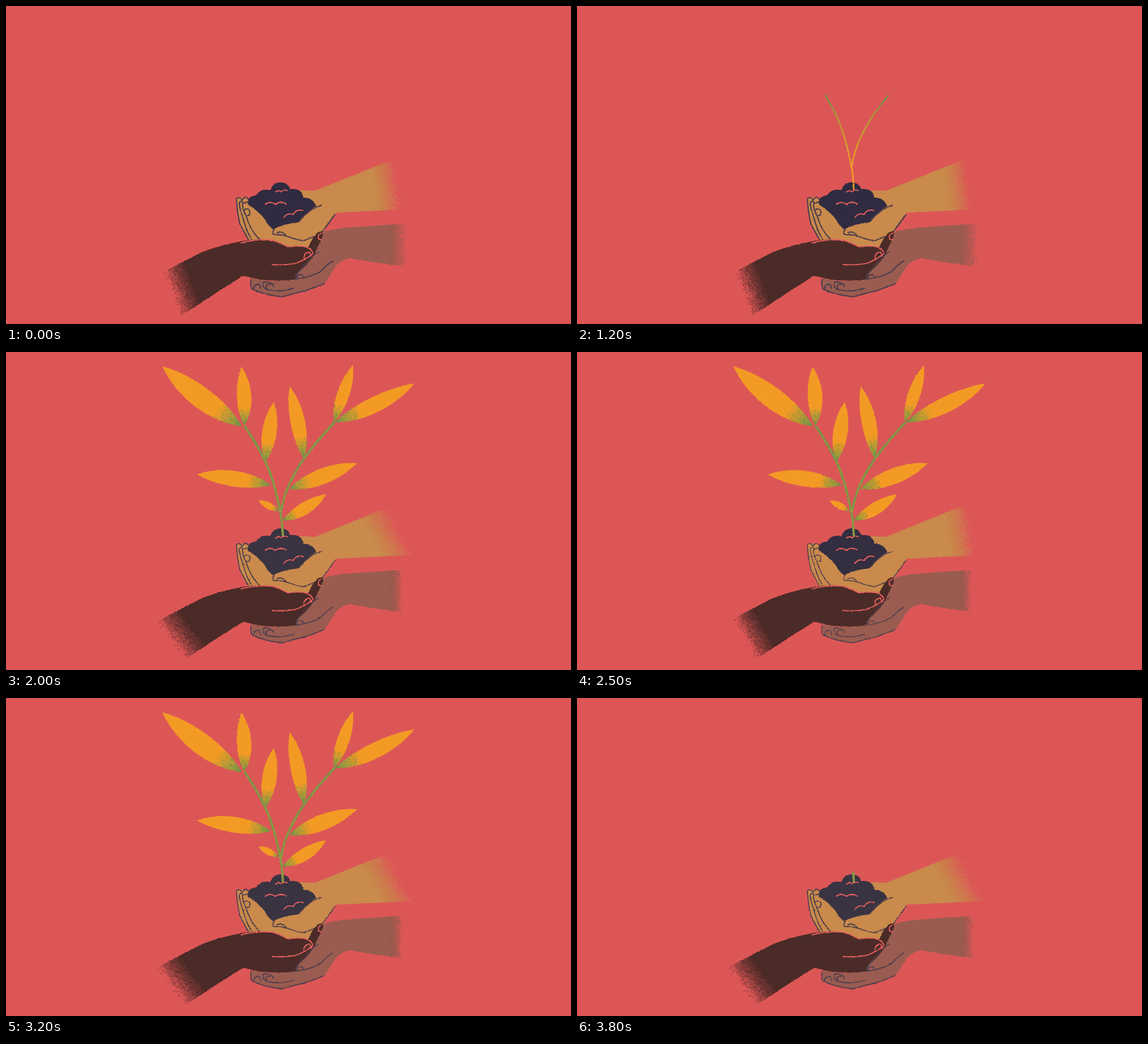
An HTML page with a canvas that plays this animation: 998x561 px, repeating every 3900 ms.

```html
<!DOCTYPE html>
<html lang="en">
<head>
<meta charset="utf-8">
<title>Growing together</title>
<style>
html, body { margin: 0; width: 100%; height: 100%; overflow: hidden; background: #dd5656; }
canvas { display: block; }
svg { position: absolute; width: 0; height: 0; }
</style>
</head>
<body>
<canvas id="stage" width="998" height="561"></canvas>
<svg>
  <filter id="rough" x="0" y="0" width="1" height="1" color-interpolation-filters="sRGB">
    <feTurbulence id="noise" type="fractalNoise" baseFrequency=".3" numOctaves="2"/>
    <feColorMatrix values="1 0 0 0 0  0 1 0 0 0  0 0 1 0 0  0 0 0 0 1" result="bumps"/>
    <feDisplacementMap in="SourceGraphic" in2="bumps" scale="2.5" xChannelSelector="R" yChannelSelector="G"/>
  </filter>
</svg>
<script>
const W = 998, H = 561, STEP = 100, STEPS = 39;
const BG = '#dd5656', TAN = '#c98a4b', DARK = '#4a2b27', BROWN = '#9a5c50';
const INK = '#4c3d4c', PINK = '#e8605f', ORANGE = '#f39a24', GREEN = '#66904a';

const stage = document.getElementById('stage');
const noise = document.getElementById('noise');
const view = stage.getContext('2d');
stage.style.filter = 'url(#rough)';

// Line weight, soil colour and fade axes (solid x, y, gone x, y) of the three alternating drawings
const poses = [
  { line: 2.2, soil: '#302b40', tan: [652, 322, 694, 316], brown: [676, 420, 709, 420], dark: [333, 490, 290, 506] },
  { line: 1.5, soil: '#332e40', tan: [656, 322, 699, 315], brown: [676, 420, 697, 420], dark: [333, 484, 293, 507] },
  { line: 1.8, soil: '#393342', tan: [645, 323, 690, 298], brown: [678, 420, 701, 420], dark: [330, 482, 290, 513] }
];

const shapes = {
  tan: `M407 339 L418 337 L428 341 L440 345 L522 325 L545 326 Q620 296 720 256 V358 Q640 362 582 365
    L566 390 Q558 402 556 415 L540 432 H435 L427 412 L413 388 Q408 362 407 339Z`,
  soil: `M427 350 Q425 336 442 334 Q450 321 467 325 Q471 311 486 311 Q499 312 502 323 Q523 321 525 338
    Q542 338 548 353 Q537 359 529 368 Q522 378 515 382 Q490 384 472 394 Q463 388 457 376 Q445 361 427 350Z`,
  dark: `M255 482 Q320 447 346 434 Q380 421 420 414 Q446 409 470 413 Q486 418 498 425 Q516 422 527 424
    L534 425 Q541 409 549 401 Q554 396 558 398 Q562 400 560 408 L545 440 L516 482 Q485 487 450 483
    Q435 480 419 476 Q374 504 335 530 L290 559Z`,
  brown: `M562 398 Q575 394 600 391 Q660 386 715 384 V461 Q650 453 607 445 Q590 449 582 460 L563 490
    Q525 506 488 513 Q458 510 440 503 Q431 496 433 486 L435 480 Q470 489 512 482 Q512 472 522 465
    Q538 450 545 437 Q550 424 557 412Z`
};

const inkLines = {
  tan: `M428 412 Q416 390 413 384 Q408 362 407 340 Q413 335 417 343 Q423 333 428 341
    M412 347 Q413 360 418 372 Q424 396 433 410 M418 348 Q417 358 424 370 Q431 395 447 411
    M412 347 Q416 342 420 348 L428 345 M421 360 Q427 355 431 362 L430 369 L424 370
    M557 352 Q542 356 534 364 Q524 371 518 380 M474 394 Q470 397 472 403 Q488 403 499 407
    Q515 413 526 414 Q546 406 556 402 Q568 386 581 368 M478 400 Q490 396 494 405`,
  brown: `M552 434 Q541 439 531 453 Q517 467 512 476 V482 Q544 477 557 467 Q568 455 577 450
    M515 481 Q512 473 523 474 L527 480 M433 482 Q431 492 434 499 Q456 510 488 513 Q508 507 530 502
    L562 490 M437 500 Q438 490 447 491 L450 499 M455 487 Q470 486 473 495
    M455 487 Q451 499 466 501 Q486 505 508 498 M461 499 Q456 490 467 491`
};

const pinkLines = {
  soil: `M458 350 Q467 343 476 350 Q484 343 495 349 M491 373 Q497 364 507 368 Q513 357 525 361
    M476 328 Q482 324 486 328 Q491 323 497 326`,
  dark: `M415 418 Q440 411 470 413 Q484 417 498 425 Q518 422 530 425 Q542 430 542 437
    Q530 447 512 454 Q490 458 470 456 M527 446 Q524 436 536 434 L539 441
    M557 401 Q550 402 552 411 L558 413`
};

function seeded(seed) {
  return () => {
    seed = seed + 0x6d2b79f5 | 0;
    let v = Math.imul(seed ^ seed >>> 15, 1 | seed);
    v ^= v + Math.imul(v ^ v >>> 7, 61 | v);
    return ((v ^ v >>> 14) >>> 0) / 4294967296;
  };
}

// Dots that thin out from (x, y) along the axis (dx, dy)
function grain(g, x, y, dx, dy, spread, count, color, random) {
  const len = Math.hypot(dx, dy);
  g.fillStyle = color;
  for (let i = 0; i < count; i++) {
    const t = 1 - Math.sqrt(1 - random());
    const u = (random() - .5) * spread / len;
    g.fillRect(x + dx * t - dy * u, y + dy * t + dx * u, 1.2, 1.2);
  }
}

function stroke(g, path, color, width) {
  g.strokeStyle = color;
  g.lineWidth = width;
  g.stroke(new Path2D(path));
}

function drawArm(g, path, color, [x, y, endX, endY], random) {
  const dx = endX - x, dy = endY - y;
  const fade = g.createLinearGradient(x, y, x + dx * .85, y + dy * .85);
  fade.addColorStop(0, color);
  fade.addColorStop(1, color + '00');
  const shape = new Path2D(path);
  g.save();
  g.clip(shape);
  g.fillStyle = fade;
  g.fill(shape);
  g.globalAlpha = .6;
  grain(g, x, y, dx, dy, 150, 2600, color, random);
  g.restore();
}

function drawHands(pose, i) {
  const layer = document.createElement('canvas');
  layer.width = W;
  layer.height = H;
  const g = layer.getContext('2d'), random = seeded(i + 1);
  g.lineCap = g.lineJoin = 'round';
  g.fillStyle = BG;
  g.fillRect(0, 0, W, H);
  drawArm(g, shapes.tan, TAN, pose.tan, random);
  g.fillStyle = pose.soil;
  g.fill(new Path2D(shapes.soil));
  stroke(g, pinkLines.soil, PINK, 1.9);
  stroke(g, inkLines.tan, INK, pose.line);
  drawArm(g, shapes.dark, DARK, pose.dark, random);
  drawArm(g, shapes.brown, BROWN, pose.brown, random);
  stroke(g, pinkLines.dark, PINK, 1.9);
  stroke(g, inkLines.brown, INK, pose.line);
  return layer;
}

const hands = poses.map(drawHands);

const STEM = `M489 325 Q488 300 485 285 Q477 242 466 212 Q452 175 421 130
  M485 285 Q490 256 499 236 Q514 204 530 183 Q550 156 581 123`;

// Base x, y, tip x, y, half width, sideways bow, first and last step of growth
const leaves = [
  [417, 131, 276, 25, 19, -3, 15, 20], [421, 130, 416, 26, 13, 2, 15, 20],
  [458, 193, 473, 88, 13, 0, 13, 18], [468, 235, 337, 216, 14, 2, 12, 17],
  [481, 280, 446, 262, 6, 0, 12, 16], [489, 297, 565, 251, 11, 2, 12, 16],
  [500, 242, 620, 196, 14, 0, 12, 17], [526, 188, 501, 60, 13, 2, 13, 18],
  [579, 124, 613, 23, 11, 0, 15, 20], [581, 124, 722, 55, 14, 3, 15, 20]
];

const stemTop = [[5, 330], [6, 318], [12, 157], [14, 122], [34, 122], [36, 186], [38, 306], [39, 330]];

function ramp(v, from, to) {
  return Math.min(1, Math.max(0, (v - from) / (to - from)));
}

function keyed(keys, v) {
  let value = keys[0][1];
  for (let i = 1; i < keys.length; i++) {
    value += (keys[i][1] - keys[i - 1][1]) * ramp(v, keys[i - 1][0], keys[i][0]);
  }
  return value;
}

function drawStem(g, n) {
  const top = keyed(stemTop, n), ripe = ramp(n, 12, 19);
  if (top > 325) return;
  const tint = g.createLinearGradient(0, 285, 0, 155);
  tint.addColorStop(0, ORANGE);
  tint.addColorStop(.6, '#bd9c30');
  tint.addColorStop(1, GREEN);
  g.save();
  g.beginPath();
  g.rect(0, top, W, H);
  g.clip();
  stroke(g, STEM, tint, 2.7 + ripe);
  g.globalAlpha = ripe;
  stroke(g, STEM, GREEN, 4);
  g.setLineDash([1.3, 2]);
  stroke(g, STEM, '#c4a63b', 2.6);
  g.restore();
}

function drawLeaf(g, [x, y, tipX, tipY, half, bow, start, end], n, random) {
  const grow = ramp(n, start, end) * (1 - ramp(n, 32, 35));
  if (!grow) return;
  const dx = (tipX - x) * grow, dy = (tipY - y) * grow, len = Math.hypot(dx, dy);
  const at = (t, side) => {
    const u = (half * side + bow) * grow * 4 / 3 / len;
    return [x + dx * t - dy * u, y + dy * t + dx * u];
  };
  g.save();
  g.beginPath();
  g.moveTo(x, y);
  g.bezierCurveTo(...at(.27, 1), ...at(.7, 1), x + dx, y + dy);
  g.bezierCurveTo(...at(.7, -1), ...at(.27, -1), x, y);
  g.clip();
  const tint = g.createLinearGradient(x, y, x + dx * .3, y + dy * .3);
  tint.addColorStop(0, GREEN);
  tint.addColorStop(.35, '#a59a3a');
  tint.addColorStop(1, ORANGE);
  g.fillStyle = tint;
  g.fill();
  grain(g, x, y, dx * .32, dy * .32, half * 2.2, len * half / 14, GREEN, random);
  grain(g, x, y, dx, dy, half * 2.2, len * half / 40, '#e48d2b', random);
  g.restore();
}

function draw(now) {
  const n = Math.floor(now / STEP) % STEPS, pose = n % 3, random = seeded(pose + 20);
  noise.setAttribute('seed', pose + 1);
  view.drawImage(hands[pose], 0, 0);
  drawStem(view, n);
  leaves.forEach(leaf => drawLeaf(view, leaf, n, random));
  requestAnimationFrame(() => draw(performance.now()));
}
draw(performance.now());
</script>
</body>
</html>
```
